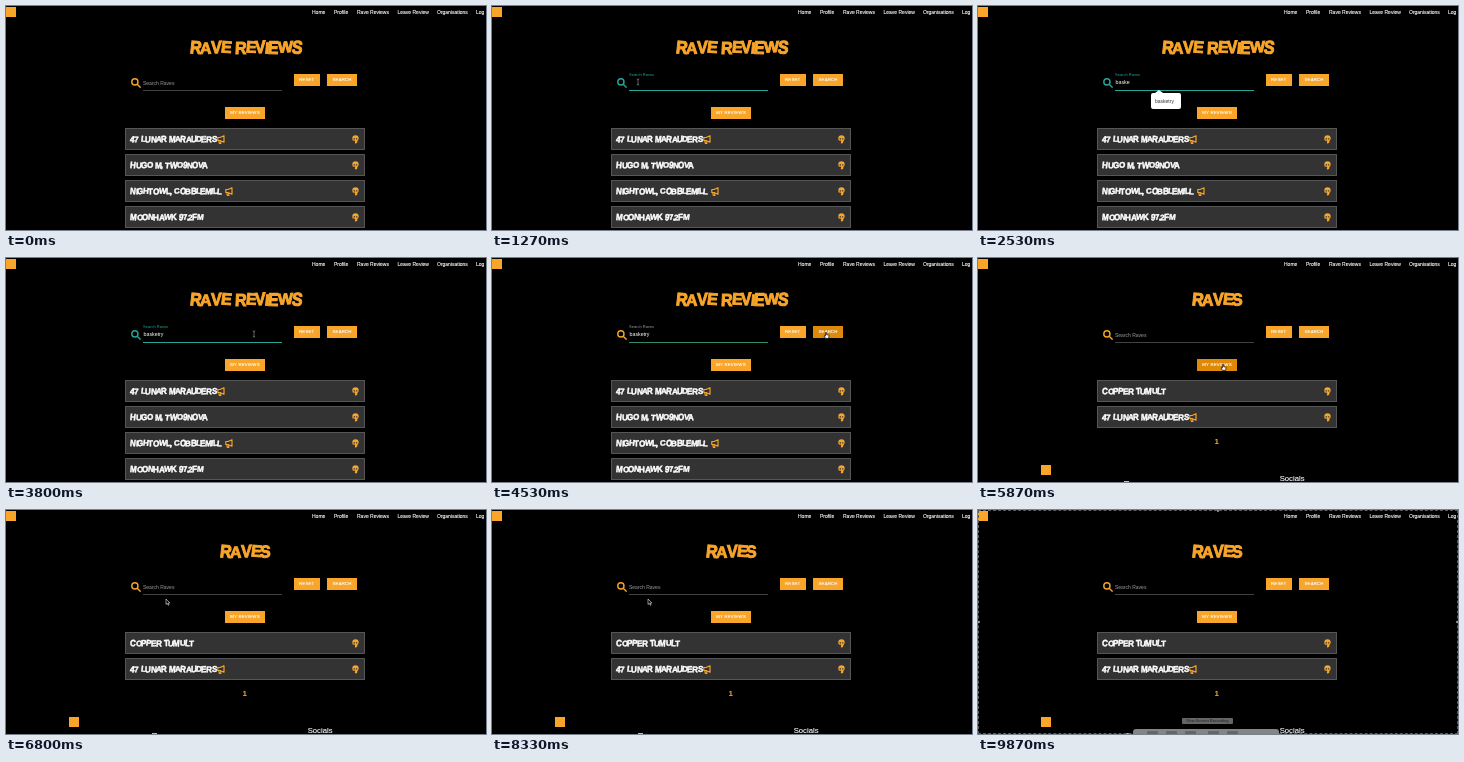
An HTML page that plays this animation: 480 by 224 pixels, repeating every 9940 ms.

```html
<!DOCTYPE html>
<html lang="en">
<head>
<meta charset="utf-8">
<title>Rave Reviews</title>
<style>
  html, body { margin: 0; width: 100%; height: 100%; overflow: hidden; background: #000; }
  #stage {
    position: relative; width: 480px; height: 224px; overflow: hidden; background: #000;
    color: #fff; font: 5px/1 "Liberation Sans", Arial, sans-serif;
    --orange: #f9a52a;
  }
  #stage * { box-sizing: border-box; }
  #stage div, #stage svg { position: absolute; }
  .text { white-space: pre; transform: translateY(-50%); }
  .nav { -webkit-text-stroke: .12px currentColor; }
  .graf { white-space: pre; font-weight: 700; transform: translateY(-50%); }
  .graf span { display: inline-block; -webkit-text-stroke: .06em currentColor; }
  .graf .gap { width: .32em; }
  .title { color: var(--orange); font-size: 16px; letter-spacing: -1.1px; top: 42.2px; }
  .card {
    left: 119px; width: 240px; height: 21.5px;
    background: #333; border: 1px solid #565656;
  }
  .card .graf { left: 4.4px; top: 10.5px; font-size: 8px; letter-spacing: -.5px; }
  .button {
    height: 11.5px; padding: 0 5.33px; background: var(--orange);
    font-size: 4.35px; line-height: 11.5px; letter-spacing: .17px; white-space: nowrap;
    -webkit-text-stroke: .12px currentColor;
  }
  .icon { color: var(--orange); overflow: visible; }
  #label { left: 137px; transform-origin: 0 50%; white-space: pre; }
  #line { left: 137px; top: 84px; width: 138.5px; height: 1px; }
  #popup { left: 172.5px; top: 87px; width: 30px; background: #fff; border-radius: 2px; color: #333; }
  #popup::before {
    content: ""; position: absolute; left: 4px; top: -3px;
    border: solid transparent; border-width: 0 4px 3.2px; border-bottom-color: #fff;
  }
  #popup .text { left: 4.5px; }
  #frame { inset: 0; border: 1px dashed #5c5c5c; }
  #frame .knob { width: 2.4px; height: 2.4px; border-radius: 50%; background: #aaa; }
  #bar { left: 155px; top: 219px; width: 146px; height: 12px; border-radius: 3px; background: #858585; }
  #bar .tool { top: 2px; width: 11px; height: 8px; border-radius: 1px; background: #666; }
  #tip {
    left: 204px; top: 208px; width: 51px; height: 6.4px; border-radius: 1px;
    background: #656565; color: #222; font-size: 4.1px; line-height: 6.4px; text-align: center; white-space: nowrap;
  }
</style>
</head>
<body>
<svg width="0" height="0" style="position:absolute">
  <symbol id="horn" viewBox="0 0 8 9">
    <path d="M.8 2.5H3L7 .8V7.2L3 5.5H.8ZM1.8 5.6 2.3 8.3H3.9L3.6 5.8" fill="none" stroke="currentColor" stroke-width="1.15" stroke-linejoin="round"/>
  </symbol>
  <symbol id="skull" viewBox="0 0 7 9">
    <path fill="currentColor" d="M.3 3.3A3.2 3.1 0 0 1 6.7 3.3Q6.8 5.2 5.4 5.9L5.2 7.8 3.9 8.6 2.8 8.2 3.2 5.8.6 5.4Z"/>
    <path fill="#333" d="M1.6 3.2h1.5v1.2H1.6ZM4.1 3.2h1.2v1.2H4.1Z"/>
  </symbol>
  <symbol id="lens" viewBox="0 0 10 10">
    <g fill="none" stroke="currentColor" stroke-width="1.4">
      <circle cx="3.9" cy="3.9" r="3.1"/><path d="M6.2 6.2 9.6 9.6"/>
    </g>
  </symbol>
  <symbol id="arrow" viewBox="0 0 8 10" overflow="visible">
    <path d="M0 0V5.4L1.3 4.3 2.2 6.3 3.1 5.9 2.2 4H3.9Z" fill="#000" stroke="#fff" stroke-width=".55"/>
  </symbol>
  <symbol id="beam" viewBox="0 0 8 10" overflow="visible">
    <path d="M-1.2-3Q0-3 0-2.2V2.2Q0 3-1.2 3M1.2-3Q0-3 0-2.2M0 2.2Q0 3 1.2 3" fill="none" stroke="#aaa" stroke-width=".6"/>
  </symbol>
  <symbol id="hand" viewBox="0 0 8 10" overflow="visible">
    <path d="M-.6-1.4Q0-2.1.6-1.4V.6L2.6 1.1Q3.2 1.4 3 2.3L2.5 4.4H-.5L-2 2Q-1.7 1.2-.6 2Z" fill="#fff" stroke="#111" stroke-width=".8"/>
  </symbol>
</svg>

<div id="stage"></div>

<script>
const LOOP = 9940, STEP = 200 / 3;
const ORANGE = [249, 165, 42], DARK = [222, 137, 8], TEAL = [38, 166, 154],
      GRAY = [158, 158, 158], RULE = [66, 66, 66], GREEN = [46, 140, 112];
const WORD = "basketry";

const text = (x, y, s, style = "", cls = "") =>
  `<div class="text ${cls}" style="left:${x}px;top:${y}px;${style}">${s}</div>`;

const icon = (name, x, y, w, h, cls = "") =>
  `<svg class="icon ${cls}" style="left:${x}px;top:${y}px" width="${w}" height="${h}"><use href="#${name}"/></svg>`;

// Lettering with a hand-sprayed wobble
const graf = (s, cls = "", style = "") => {
  const letters = [...s.toUpperCase()].map((c, i) => {
    if (c === " ") return `<span class="gap"> </span>`;
    const turn = 4 * Math.sin(i * 2.3 + 1), drop = .04 * Math.sin(i * 1.7);
    const tall = 1.06 + .09 * Math.sin(i * 2.9 + 1);
    return `<span style="transform:translateY(${drop}em) rotate(${turn}deg) skewX(-3deg) scaleY(${tall})">${c}</span>`;
  });
  return `<div class="graf ${cls}" style="${style}">${letters.join("")}</div>`;
};

const card = (row, name, hornX) =>
  `<div class="card" style="top:${122.3 + row * 26}px">${graf(name)}</div>` +
  icon("skull", 345.5, 128.6 + row * 26, 7, 9, "late") +
  (hornX ? icon("horn", hornX, 129 + row * 26, 8, 9, "late") : "");

const button = (id, x, y, s) =>
  `<div class="button" id="${id}" style="left:${x}px;top:${y}px">${s}</div>`;

const nav = [[306, "Home"], [328, "Profile"], [351, "Rave Reviews"], [391.5, "Leave Review"],
  [431, "Organisations"], [470, "Log Out"]];
const knobs = [[-1, 110], [477, 110], [238, -1]];

stage.innerHTML = `
  <div style="left:0;top:1px;width:10px;height:10px;background:var(--orange)"></div>
  ${nav.map(([x, s]) => text(x, 6, s, "", "nav")).join("")}
  ${icon("lens", 125, 72, 10, 10, "late")}
  <div id="label">Search Raves</div>
  ${text(137.5, 77, `<span id="typed"></span>`, "font-size:5.3px")}
  <div id="line"></div>
  ${button("reset", 287.7, 68.2, "RESET")}
  ${button("search", 321.2, 68.2, "SEARCH")}
  ${button("mine", 219, 101.3, "MY REVIEWS")}
  <div id="all">
    ${graf("Rave Reviews", "title", "left:184px")}
    ${card(0, "47 Lunar Marauders", 211)}
    ${card(1, "Hugo M, Two9Nova")}
    ${card(2, "Nightowl, Cobblemill", 218.5)}
    ${card(3, "Moonhawk 97.2FM")}
  </div>
  <div id="found">
    ${graf("Raves", "title", "left:214px")}
    ${card(0, "Copper Tumult")}
    ${card(1, "47 Lunar Marauders", 211)}
    ${text(236.6, 184, "1", "font-size:8px;font-weight:700;color:var(--orange)")}
    <div style="left:63px;top:206.5px;width:10px;height:10px;background:var(--orange)"></div>
    ${text(301.7, 220.5, "Socials", "font-size:7.7px", "nav")}
    <div class="late" style="left:146px;top:223px;width:4.5px;height:1px;background:#bbb"></div>
  </div>
  <div id="popup">${[WORD, "bandstand", "banjo"].map((s, i) => text(4.5, 8.3 + 11 * i, s)).join("")}</div>
  <div id="frame">${knobs.map(([x, y]) => `<div class="knob" style="left:${x}px;top:${y}px"></div>`).join("")}</div>
  <div id="bar">${[14, 33, 52, 75, 94].map(x => `<div class="tool" style="left:${x}px"></div>`).join("")}</div>
  <div id="tip">New Screen Recording</div>
  <svg id="cursor" width="8" height="10" style="overflow:visible"><use/></svg>`;

const $ = id => document.getElementById(id);
const lens = document.querySelector("#stage > .icon");
const late = document.querySelectorAll(".late");
const cursorUse = document.querySelector("#cursor use");

const clamp = v => Math.max(0, Math.min(1, v));
const ramp = (t, a, b) => { const p = clamp((t - a) / (b - a)); return p * p * (3 - 2 * p); };
const mix = (a, b, p) => `rgb(${a.map((v, i) => v + (b[i] - v) * p)})`;
const show = (el, on) => { el.style.display = on ? "" : "none"; };

// Each move: start, end, target x, target y
const moves = [[10, 130, 143, 92], [340, 730, 146, 76], [3270, 4270, 334, 76], [5210, 5530, 252, 106],
  [5610, 5760, 244.5, 107.5], [6340, 6870, 155.5, 88.5], [9140, 9800, 230, 226]];

function cursorAt(t) {
  let x = 198, y = 133;
  for (const [a, b, tx, ty] of moves) {
    const p = ramp(t, a, b);
    x += (tx - x) * p;
    y += (ty - y) * p;
  }
  return [x, y];
}

function cursorShape(x, y) {
  const inside = (l, top, r, b) => x > l && x < r && y > top && y < b;
  if (inside(288, 68, 314, 80) || inside(321, 68, 351, 80) || inside(219, 101, 259, 113)) return "hand";
  if (inside(137, 70, 276, 85) || inside(124, 128, 209, 139)) return "beam";
  return "arrow";
}

const keys = [1930, 2070, 2130, 2270, 2470, 2670, 2730, 2930];

function draw(t) {
  const found = t >= 4728, ready = !found || t >= 4862;
  show($("all"), !found);
  show($("found"), found);
  late.forEach(el => show(el, ready));

  const lift = found ? 0 : ramp(t, 930, 1200);
  const blur = ramp(t, 4270, 4530);
  const focus = found ? 0 : lift * (1 - blur);
  $("label").style.top = 74.5 - 8.7 * lift + "px";
  $("label").style.transform = `scale(${1 - .2 * lift})`;
  $("label").style.color = mix(GRAY, TEAL, focus);
  lens.style.color = mix(ORANGE, TEAL, focus);
  $("line").style.background = !found && blur > 0 ? mix(TEAL, GREEN, blur) : mix(RULE, TEAL, lift);

  const count = found ? 0 : keys.filter(k => t >= k - 4).length;
  $("typed").textContent = WORD.slice(0, count);
  show($("popup"), t >= 1526 && t < 2926);
  const rows = count === 1 || count === 2 ? 3 : 1;
  $("popup").style.height = 16 + 11 * (rows - 1) + "px";
  [...$("popup").children].forEach((el, i) => show(el, i < rows));

  const overSearch = found
    ? ramp(t, 4800, 5000) - ramp(t, 5270, 5470)
    : ramp(t, 4070, 4270);
  $("search").style.background = mix(ORANGE, DARK, overSearch);
  $("mine").style.background = mix(ORANGE, DARK, ramp(t, 5530, 5800) - ramp(t, 6470, 6700));

  const [x, y] = cursorAt(t);
  show($("cursor"), t < 1926 || t >= 3326);
  $("cursor").style.left = x + "px";
  $("cursor").style.top = y + "px";
  cursorUse.setAttribute("href", "#" + cursorShape(x, y));

  const overlay = clamp((t - 8530) / 200);
  $("frame").style.opacity = $("bar").style.opacity = overlay;
  show($("tip"), t >= 9726);
}

function tick() {
  const t = performance.now() % LOOP;
  draw(Math.floor((t + 5) / STEP) * STEP);
  requestAnimationFrame(tick);
}
tick();
</script>
</body>
</html>
```
